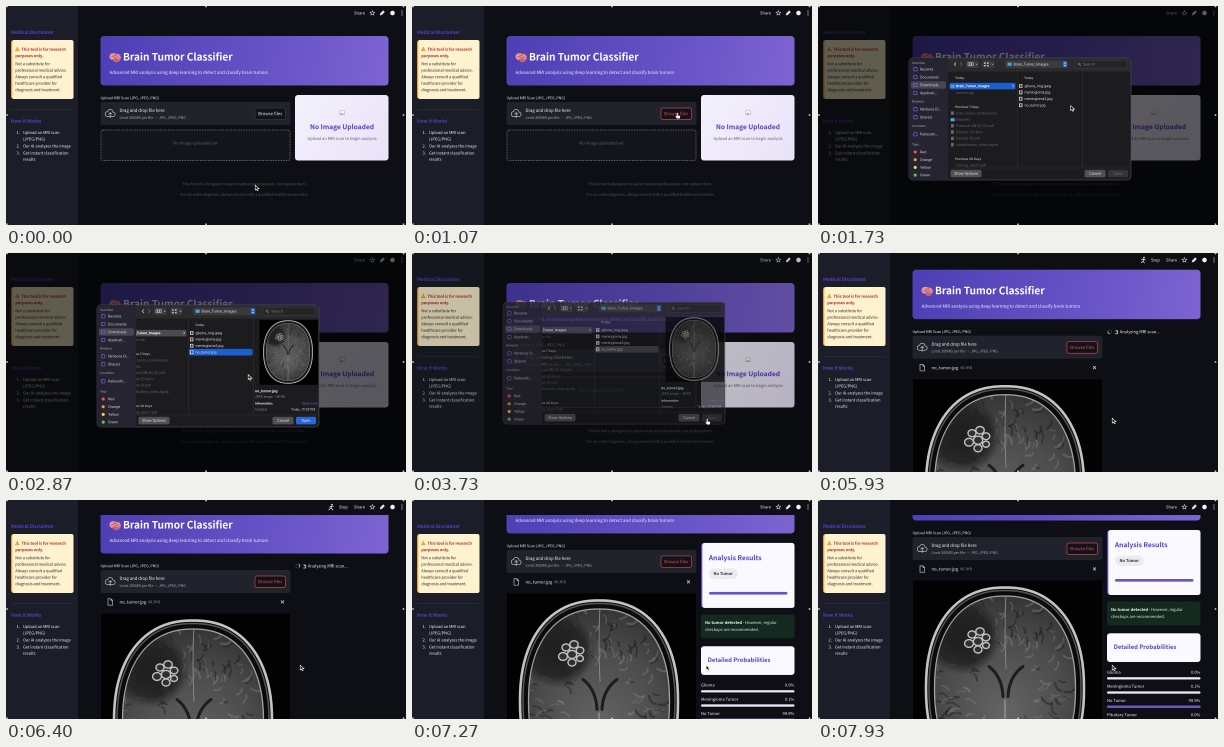
An HTML page with a canvas for the animation above (8000 ms loop, 400x219 px).

```html
<!DOCTYPE html>
<html lang="en">
<head>
<meta charset="utf-8">
<title>Brain Tumor Classifier</title>
<style>
html, body { margin: 0; width: 100%; height: 100%; overflow: hidden; background: #0d0f15; }
canvas { display: block; width: 400px; height: 219px; }
</style>
</head>
<body>
<canvas id="stage"></canvas>
<script>
const W = 400, H = 219, LOOP = 8000;
const dpr = window.devicePixelRatio || 1;
const screen2d = document.getElementById('stage').getContext('2d');
const g = document.createElement('canvas').getContext('2d');
// Drawn large and scaled down, so that tiny text stays smooth.
const ZOOM = 4 * dpr;
screen2d.canvas.width = W * dpr;
screen2d.canvas.height = H * dpr;
screen2d.imageSmoothingQuality = 'high';
g.canvas.width = W * ZOOM;
g.canvas.height = H * ZOOM;

const WEB = '"Noto Sans CJK SC", "Noto Sans CJK JP", "Noto Sans", sans-serif';
const MAC = 'Inter, sans-serif';
const PURPLE = '#5b41c0';

const clamp = v => Math.max(0, Math.min(1, v));
const ramp = (t, a, b) => clamp((t - a) / (b - a));
const smooth = p => p * p * (3 - 2 * p);

// Interpolates rows of [time, ...values].
function track(keys, t, ease = p => p) {
  if (t <= keys[0][0]) return keys[0].slice(1);
  for (let i = 1; i < keys.length; i++) {
    const a = keys[i - 1], b = keys[i];
    if (t <= b[0]) {
      const p = ease(ramp(t, a[0], b[0]));
      return a.slice(1).map((v, k) => v + (b[k + 1] - v) * p);
    }
  }
  return keys[keys.length - 1].slice(1);
}

// y is the vertical middle of the capitals.
function text(str, x, y, size, color, { bold = false, align = 'left', font = WEB } = {}) {
  g.font = `${bold ? 700 : 400} ${size}px ${font}`;
  g.textAlign = align;
  g.fillStyle = color;
  g.fillText(str, x, y + size * 0.35);
}

function box(x, y, w, h, r, fill, stroke, line = 0.6) {
  g.beginPath();
  g.roundRect(x, y, w, h, r);
  paint(fill, stroke, line);
}

function oval(x, y, rx, ry, fill, stroke, line = 0.6) {
  g.beginPath();
  g.ellipse(x, y, rx, ry, 0, 0, Math.PI * 2);
  paint(fill, stroke, line);
}

function paint(fill, stroke, line) {
  if (fill) { g.fillStyle = fill; g.fill(); }
  if (stroke) { g.strokeStyle = stroke; g.lineWidth = line; g.stroke(); }
}

function path(d, color, line = 0.7, fill) {
  const p = new Path2D(d);
  if (fill) { g.fillStyle = fill; g.fill(p); }
  if (color) { g.strokeStyle = color; g.lineWidth = line; g.stroke(p); }
}

function at(x, y, draw, scale = 1) {
  g.save();
  g.translate(x, y);
  g.scale(scale, scale);
  draw();
  g.restore();
}

function clipTo(x, y, w, h, draw) {
  g.save();
  g.beginPath();
  g.rect(x, y, w, h);
  g.clip();
  draw();
  g.restore();
}

function slope(x0, y0, x1, y1, ...colors) {
  const s = g.createLinearGradient(x0, y0, x1, y1);
  colors.forEach((c, i) => s.addColorStop(i / (colors.length - 1), c));
  return s;
}

function random(seed) {
  return () => (seed = (seed * 16807) % 2147483647) / 2147483647;
}

// Superellipse: a little squarer than an oval.
function headPath(cx, cy, rx, ry) {
  const bend = v => Math.sign(v) * Math.abs(v) ** 0.88;
  g.beginPath();
  for (let i = 0; i < 90; i++) {
    const a = i * Math.PI / 45;
    g.lineTo(cx + rx * bend(Math.cos(a)), cy + ry * bend(Math.sin(a)));
  }
  g.closePath();
}

// Simplified head scan, 189 by 214.
function scan() {
  const cx = 92, cy = 108, rnd = random(77);
  const head = (inset, fill, stroke, line) => {
    headPath(cx, cy, 79 - inset, 101 - inset);
    paint(fill, stroke, line);
  };
  g.fillStyle = '#020202';
  g.fillRect(0, 0, 189, 214);
  head(0, '#0b0b0b', '#c4c4c4', 2.6);
  head(3, null, '#555555', 1.5);
  const tone = g.createRadialGradient(cx, cy + 25, 8, cx, cy, 96);
  tone.addColorStop(0, '#626262');
  tone.addColorStop(0.6, '#4c4c4c');
  tone.addColorStop(1, '#343434');
  head(8.5, tone, '#a2a2a2', 1.3);
  g.save();
  headPath(cx, cy, 70, 92);
  g.clip();
  g.lineCap = 'round';
  for (let i = 0; i < 170; i++) {
    const a = rnd() * Math.PI * 2, d = 0.4 + 0.58 * rnd();
    const x = cx + Math.cos(a) * 70 * d, y = cy + Math.sin(a) * 92 * d;
    const turn = a + (rnd() - 0.5) * 2, len = 3 + rnd() * 6;
    const dx = Math.cos(turn) * len, dy = Math.sin(turn) * len;
    g.beginPath();
    g.moveTo(x, y);
    g.quadraticCurveTo(x + dx - dy * 0.5, y + dy + dx * 0.5, x + dx * 1.4, y + dy * 1.4);
    g.strokeStyle = i % 2 ? 'rgba(22,22,22,.4)' : 'rgba(150,150,150,.3)';
    g.lineWidth = 1 + rnd() * 1.4;
    g.stroke();
  }
  path('M93 14Q91 45 93 88', '#8c8c8c', 0.9);
  path('M92 150V200', '#b0b0b0', 1.4);
  path('M76 86Q89 96 90 116M110 86Q96 96 95 116', '#1d1d1d', 3);
  path('M92 120V140', '#858585', 2);
  const swelling = g.createRadialGradient(50, 56, 8, 50, 56, 38);
  swelling.addColorStop(0, '#202020');
  swelling.addColorStop(0.65, 'rgba(34,34,34,.85)');
  swelling.addColorStop(1, 'rgba(34,34,34,0)');
  oval(50, 56, 38, 38, swelling);
  g.restore();
  for (const [x, y, r] of [[59, 54, 4], [67, 51, 4.2], [73, 57, 3.8], [65, 61, 4.6], [56, 63, 4.4], [65, 69, 4], [73, 65, 3.4]])
    oval(x, y, r, r * 0.88, '#303030', '#c0c0c0', 1.4);
}

function sidebar() {
  g.fillStyle = '#1b1d28';
  g.fillRect(0, 0, 72, H);
  text('Medical Disclaimer', 5, 26.4, 4.65, PURPLE, { bold: true });
  box(5, 34, 62.5, 59, 2.5, '#f0a420');
  box(6.3, 34, 61.2, 59, 2, '#fef2cf');
  path('M11.3 41L13.4 45H9.2Z', '#c8801c', 0.3, '#f3b32c');
  text('This tool is for research', 15.5, 43.5, 3.9, '#b5271f', { bold: true });
  text('purposes only.', 9.3, 50, 3.9, '#b5271f', { bold: true });
  ['Not a substitute for', 'professional medical advice.', 'Always consult a qualified',
    'healthcare provider for', 'diagnosis and treatment.'].forEach((s, i) =>
    text(s, 9.3, 58 + i * 6.5, 3.9, '#2b2926'));
  g.fillStyle = '#333541';
  g.fillRect(5, 103.5, 62.5, 0.5);
  text('How It Works', 5, 115, 4.65, PURPLE, { bold: true });
  [['1.', 'Upload an MRI scan', 126.5], ['', '(JPEG/PNG)', 133], ['2.', 'Our AI analyzes the image', 140],
    ['3.', 'Get instant classification', 147], ['', 'results', 153.3]].forEach(([n, s, y]) => {
    text(n, 10.5, y, 4, '#f6f6fa');
    text(s, 17, y, 4, '#f6f6fa');
  });
}

function header(t, running) {
  g.fillStyle = '#0d0f15';
  g.fillRect(72, 0, W - 72, 15);
  if (running) {
    const k = Math.sin(t / 90) * 0.8;
    oval(326, 4.6, 0.8, 0.8, '#f0f0f0');
    path(`M325.7 5.8L325 8L${326.5 + k} 10.2M325 8L${323.2 - k} 10M323.2 ${6.6 + k}L325.6 6L327.6 ${7.2 - k}`, '#f0f0f0', 0.7);
    text('Stop', 333, 7, 4.1, '#f4f4f7');
  }
  text('Share', 348, 7, 4.1, '#f4f4f7');
  at(366.4, 7, () => {
    g.beginPath();
    for (let i = 0; i < 10; i++) {
      const r = i % 2 ? 1.1 : 2.5, a = i * Math.PI / 5 - Math.PI / 2;
      g.lineTo(Math.cos(a) * r, Math.sin(a) * r);
    }
    g.closePath();
    paint(null, '#e8e8ec', 0.5);
  });
  path('M374.2 9L374.6 7.4L377.2 4.8L378.4 6L375.8 8.6Z', '#e8e8ec', 0.6, '#e8e8ec');
  oval(386.5, 7, 2.3, 2.3, '#f2f2f4');
  for (const dy of [-2, 0, 2]) oval(396, 7 + dy, 0.55, 0.55, '#eeeeee');
}

function banner() {
  box(94.5, 30, 288, 49.5, 3.5, slope(94, 30, 382, 79, '#4f3fb4', '#6350c4', '#7d64d2'));
  at(109, 51.5, () => {
    oval(-1.6, -0.8, 3.9, 3.6, '#ec9a9b');
    oval(2.2, 0, 3.6, 3.7, '#e58c91');
    oval(1.6, 3.2, 2.8, 1.5, '#c96d78');
    path('M-4 0Q-2 -2 -.5 0T3 -1M-2 -3Q0 -1 2 -3M-3 2Q0 1 1 2.4T4.8 1', '#a44d5d', 0.6);
  });
  text('Brain Tumor Classifier', 117, 51, 10.1, '#ffffff', { bold: true });
  text('Advanced MRI analysis using deep learning to detect and classify brain tumors', 103.5, 66.5, 4.4, '#f3f0fd');
}

function uploader(hot, uploaded) {
  text('Upload MRI Scan (JPG, JPEG, PNG)', 94.5, 92, 3.65, '#f2f2f6');
  box(94.5, 96, 190, 23, 2, '#20222c');
  path('M101.5 110.5Q98.8 110 99.3 107.4Q99.8 105.6 101.5 105.7Q102.8 102.6 105.4 103.8Q107 104.5 107 106.2Q109.6 106.6 109 109Q108.6 110.5 107 110.5ZM104.2 112V106.8M102.5 108.3L104.2 106.6L105.9 108.3', '#b9bbc5', 0.7);
  text('Drag and drop file here', 113.5, 104.5, 4.25, '#fafafc');
  text('Limit 200MB per file • JPG, JPEG, PNG', 113.5, 111.6, 3.7, '#a5a7b0');
  const ink = hot ? '#ef4b4b' : '#f3f3f6';
  box(249, 102, 30.5, 11.5, 2, '#11131a', hot ? ink : '#3b3d48', 0.6);
  text('Browse files', 264.2, 107.7, 4.3, ink, { align: 'center' });
  if (uploaded) {
    path('M102 124.8H105L106.6 126.4V131.2H102ZM105 124.8V126.4H106.6', '#d0d1d8', 0.6);
    text('no_tumor.jpg', 113.5, 128, 4.2, '#fafafc');
    text('48.3KB', 142, 128, 3.7, '#8d8f99');
    path('M275 126.4L278 129.4M278 126.4L275 129.4', '#e6e6ea', 0.65);
  }
}

function emptyPanels(top) {
  g.setLineDash([1.5, 1.1]);
  box(95, top, 189, 30.5, 2, '#13151b', '#888a92', 0.6);
  g.setLineDash([]);
  text('No image uploaded yet', 189.5, top + 13, 4.15, '#5f626b', { align: 'center' });
  const shift = (top - 124) * 0.63, faint = { align: 'center' };
  text('This AI tool is designed to assist medical professionals, not replace them.', 238.5, 178 + shift, 3.7, '#575a63', faint);
  text('For accurate diagnosis, always consult with a qualified healthcare provider.', 238.5, 188.5 + shift, 3.7, '#575a63', faint);
  box(289, 89, 93.5, 65.5, 3, slope(289, 89, 382, 154, '#f4f1fd', '#e9e3f8'));
  box(333.8, 104.8, 4.6, 4, 0.4, '#f9f9fb', '#a9a7b5', 0.5);
  path('M334.2 108.4L335.6 106.6L336.6 107.6L338 108.4Z', null, 0, '#8ba783');
  text('No Image Uploaded', 336, 121, 6.65, PURPLE, { bold: true, align: 'center' });
  text('Upload an MRI scan to begin analysis', 336, 132.5, 4.05, '#66646f', { align: 'center' });
}

function spinner(t) {
  oval(291.8, 92, 2, 2, null, '#3a3c46', 0.7);
  const a = t / 130;
  g.beginPath();
  g.arc(291.8, 92, 2, a, a + 1.7);
  paint(null, '#f0f0f4', 0.7);
  path('M297.2 94H300M297.7 90.2L299 92.2M299 90.6Q300.6 92.4 299.2 94', '#c3cbd6', 0.8);
  text('Analyzing MRI scan...', 301.8, 92, 4.15, '#f6f6f9');
}

function results() {
  box(289, 89, 93.5, 65, 3, PURPLE);
  box(290.3, 89, 92.2, 65, 2.5, '#faf9ff');
  text('Analysis Results', 296.8, 104, 6.7, PURPLE, { bold: true });
  box(297, 114.5, 28.5, 10.5, 5, '#ececf0');
  text('No Tumor', 311.2, 119.6, 4, '#33323c', { bold: true, align: 'center' });
  box(297, 138, 78.5, 2.6, 1.3, '#6a51c8');
  box(289, 160.5, 93.5, 24, 2, '#14291f');
  const lead = 'No tumor detected';
  text(lead, 293, 168.7, 4, '#f4faf5', { bold: true });
  const x = 293 + g.measureText(lead).width;
  text(' - However, regular', x, 168.7, 4, '#e4f0e8');
  text('checkups are recommended.', 293, 175.6, 4, '#e4f0e8');
  box(289, 192.3, 93.5, 28.7, 3, '#faf9ff');
  text('Detailed Probabilities', 295.7, 206, 5.9, PURPLE, { bold: true });
  [['Glioma', 0], ['Meningioma Tumor', 0.1], ['No Tumor', 99.9], ['Pituitary Tumor', 0]].forEach(([name, pct], i) => {
    const y = 231.2 + i * 14.2;
    text(name, 289, y, 4.1, '#f6f6f9');
    text(pct.toFixed(1) + '%', 382.3, y, 4.1, '#f6f6f9', { align: 'right' });
    box(289, y + 5, 93.5, 2.3, 1.1, '#eceaf3');
    if (pct > 1) box(289, y + 5, 93.5 * pct / 100, 2.3, 1.1, '#6a51c8');
  });
}

function page(t) {
  const uploaded = t >= 4200, shown = t >= 5400, done = t >= 7000;
  const [scroll] = track([[5650, 0], [6200, 26], [7050, 26], [7270, 46], [7600, 59]], t);
  g.fillStyle = '#0d0f15';
  g.fillRect(0, 0, W, H);
  at(0, -scroll, () => {
    banner();
    uploader(t >= 740, uploaded);
    if (!shown) return emptyPanels(uploaded ? 139.3 : 124);
    clipTo(95, 139.5, 189, 214, () => at(95, 139.5, scan));
    if (done) results(); else spinner(t);
  });
  header(t, shown && !done);
  sidebar();
}

function folder(x, y) {
  box(x, y - 1.4, 4.2, 3.2, 0.5, '#4aa3e0');
}

function dialogSidebar() {
  box(91, 52, 39, 122, [4, 0, 0, 4], '#252430');
  const mac = (s, x, y, size, color, bold) => text(s, x, y, size, color, { font: MAC, bold });
  box(93, 75.3, 35, 7.4, 1.5, '#474651');
  for (const [s, y] of [['Favorites', 57], ['Nimbora', 95.5], ['Locations', 120], ['Tags', 138.5]])
    mac(s, 94, y, 2.9, '#858391', true);
  for (const [s, y] of [['Recents', 63.3], ['Documents', 71.2], ['Downloads', 79], ['Applicati...', 87],
    ['Nimbora Di...', 103.3], ['Shared', 111.3], ['Pellworth...', 128.3]]) {
    box(95.5, y - 1.7, 3.6, 3.4, 0.9, null, '#7a68e8', 0.65);
    mac(s, 102, y, 3.5, '#dddce4');
  }
  [['Red', '#f0544f'], ['Orange', '#f09a37'], ['Yellow', '#f2cf45'], ['Green', '#5cc45a']].forEach(([s, c], i) => {
    const y = 146 + i * 7.7;
    oval(97.2, y, 1.6, 1.6, c);
    mac(s, 102, y, 3.5, '#dddce4');
  });
}

function dialogColumns(shift, picked, accent) {
  const mac = (s, x, y, color, bold, size = 3.45) => text(s, x, y, size, color, { font: MAC, bold });
  g.translate(-shift, 0);
  g.fillStyle = '#3a3a3e';
  g.fillRect(199, 66, 0.4, 96);
  g.fillRect(264, 66, 0.4, 96);
  mac('Today', 137, 72, '#a5a5aa', true, 3.1);
  box(131.5, 76.8, 66, 6.6, 1.2, picked ? '#4a4a4f' : accent);
  folder(132.5, 80);
  mac('Brain_Tumor_Images', 138, 80, '#ffffff', true, 3.3);
  path('M194.5 78.8L195.8 80L194.5 81.2', '#dddddd', 0.5);
  mac('archive.zip', 138, 86.7, '#66666b');
  mac('Previous 7 Days', 137, 100.8, '#a5a5aa', true, 3.1);
  ['brain_tumor_model.keras', 'Datasets', 'Practical NN (6) (2).pdf', 'Dataset (2).docx', 'Dataset (1).pdf', 'classification_notes.ipynb']
    .forEach((s, i) => {
      const y = 107.2 + i * 6.3;
      if (i === 1) folder(132.5, y); else box(133, y - 1.8, 2.8, 3.5, 0.3, '#68686d');
      mac(s, 138, y, '#65656b');
    });
  mac('Previous 30 Days', 137, 152.8, '#a5a5aa', true, 3.1);
  mac('training_report.pdf', 138, 159.3, '#65656b');

  mac('Today', 206, 72, '#a5a5aa', true, 3.1);
  if (picked) box(200, 95.9, 63.5, 6.6, 1.2, accent);
  ['glioma_img.jpeg', 'meningioma.jpg', 'meningioma2.jpg', 'no_tumor.jpg'].forEach((s, i) => {
    const y = 80 + i * 6.4;
    box(201, y - 1.9, 3.4, 3.8, 0.3, '#dfdfe2');
    oval(202.7, y, 1.1, 1.5, '#444444');
    mac(s, 206.5, y, '#e6e6ea');
  });
  if (!picked) return;
  clipTo(268, 67, 63, 66, () => at(270.5, 65.5, scan, 0.31));
  mac('no_tumor.jpg', 266, 138, '#f0f0f2', true, 3.5);
  mac('JPEG image - 49 KB', 266, 143.6, '#98989e', false, 3.1);
  mac('Information', 266, 150.5, '#f0f0f2', true, 3.1);
  mac('Show Less', 313, 150.5, '#5a7ff0', false, 3.1);
  mac('Created', 266, 156.5, '#98989e', false, 3.1);
  mac('Today, 10:29 PM', 302, 156.5, '#dddddf', false, 3.1);
}

function dialog(t) {
  const picked = t >= 2400, focused = t < 3600;
  const accent = focused ? '#1b5fd0' : '#48484d';
  const mac = (s, x, y, color, align = 'left', size = 3.6) => text(s, x, y, size, color, { font: MAC, align });
  box(91, 52, 222, 122, 4, '#1c1c1f', '#505055', 0.6);
  g.fillStyle = '#2a2a2d';
  g.fillRect(130, 52.4, 182.6, 13.2);
  clipTo(130, 66, 182.5, 96, () => dialogColumns(17 * smooth(ramp(t, 2430, 2640)), picked, accent));
  g.fillStyle = '#3a3a3e';
  g.fillRect(130, 161.8, 183, 0.4);
  dialogSidebar();
  path('M138 56.3L136.3 58.2L138 60.1', '#c8c8cc', 0.7);
  path('M142.3 56.3L144 58.2L142.3 60.1', '#737378', 0.7);
  for (const x of [148, 164]) box(x, 54.5, 12.5, 7.5, 1.5, '#3a3a3e');
  for (const x of [150, 152, 154]) box(x, 56.5, 1.4, 3.4, 0.2, null, '#c8c8cc', 0.5);
  for (const x of [166, 169]) for (const y of [56.4, 59]) box(x, y, 1.7, 1.4, 0.2, '#c8c8cc');
  for (const x of [157.8, 173.5]) path(`M${x} 57.7L${x + 0.9} 58.7L${x + 1.8} 57.7`, '#c8c8cc', 0.5);
  box(187, 54.3, 63, 7.8, 1.5, '#3a3a3e');
  folder(189.5, 58);
  mac('Brain_Tumor_Images', 195.5, 58.2, '#eeeeee');
  box(244.8, 55.3, 4.2, 5.8, 1, '#2767d8');
  path('M246 57.5L246.9 56.5L247.8 57.5M246 59L246.9 60L247.8 59', '#ffffff', 0.5);
  box(257, 54.3, 52.5, 7.8, 1.5, '#242427', '#48484c', 0.4);
  oval(261, 58, 1.1, 1.1, null, '#a0a0a4', 0.5);
  path('M261.8 58.8L262.8 59.8', '#a0a0a4', 0.5);
  mac('Search', 265, 58.2, '#838388');
  box(132.5, 163.8, 31, 7.6, 1.6, '#515155');
  mac('Show Options', 148, 167.6, '#f2f2f2', 'center');
  box(266.5, 163.8, 21, 7.6, 1.6, '#515155');
  mac('Cancel', 277, 167.6, '#f2f2f2', 'center');
  const ready = picked && focused;
  box(290, 163.8, 20, 7.6, 1.6, ready ? '#2767d8' : '#343438');
  mac('Open', 300, 167.6, ready ? '#ffffff' : '#717175', 'center');
}

function pointer(t) {
  const [x, y] = track([[70, 250, 180], [750, 265, 107], [1250, 265, 107], [1650, 253.5, 100.5],
    [1850, 253.5, 100.5], [2330, 215, 99], [2620, 215, 99], [3250, 295, 166]], t, smooth);
  const hand = (t > 740 && t < 1300) || (t > 3600 && t < 4100);
  at(x, y, () => {
    if (hand) path('M-.5 0Q.3 -.8 .9 0V2.2L3 2.8Q3.5 3 3.3 4L2.8 5.7H-.2L-1.8 3.4Q-1.6 2.5 -.5 3.2Z', '#222222', 0.4, '#ffffff');
    else path('M-.8 -.8V4L.4 3L1.2 4.8L2.2 4.3L1.4 2.7H3Z', '#f4f4f4', 0.6, '#050505');
  });
}

function render(now) {
  const t = now % LOOP;
  g.setTransform(ZOOM, 0, 0, ZOOM, 0, 0);
  page(t);
  const dim = 0.62 * (ramp(t, 1250, 1500) - ramp(t, 3600, 3800));
  if (dim > 0) {
    g.fillStyle = `rgba(0,0,0,${dim})`;
    g.fillRect(0, 0, W, H);
  }
  const leave = ramp(t, 3640, 3890);
  const alpha = ramp(t, 1350, 1550) * (1 - leave);
  if (alpha > 0) {
    g.globalAlpha = alpha;
    at(0, -8 * leave, () => dialog(t));
    g.globalAlpha = 1;
  }
  pointer(t);
  // Handles of the recorded area.
  for (const x of [1, 200, 397.5])
    for (const y of [0.5, 109, 218.3])
      if (x !== 200 || y !== 109) oval(x, y, 0.9, 0.9, '#c9c9cc');
  screen2d.drawImage(g.canvas, 0, 0, W * dpr, H * dpr);
  requestAnimationFrame(render);
}
requestAnimationFrame(render);
</script>
</body>
</html>
```
